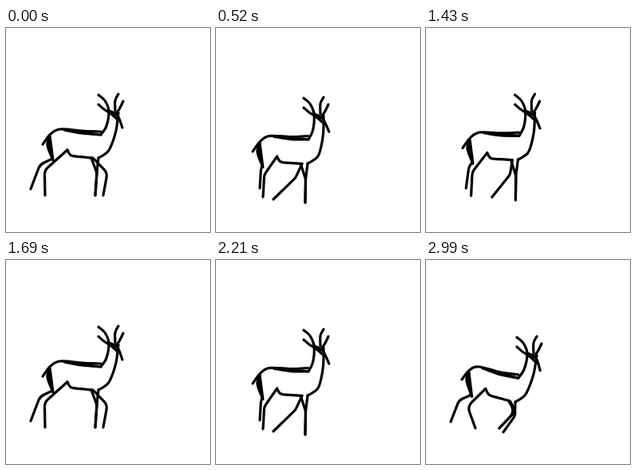
These frames come from a looping animation (256x256 px, 3120 ms). An HTML page with a canvas:

```html
<!DOCTYPE html>
<html lang="en">
<head>
<meta charset="utf-8">
<title>Walking antelope</title>
<style>
html, body { margin: 0; width: 100%; height: 100%; overflow: hidden; background: #fff; }
canvas { display: block; width: 256px; height: 256px; }
</style>
</head>
<body>
<canvas id="stage" width="256" height="256"></canvas>
<script>
const ctx = document.getElementById('stage').getContext('2d');
const STEP = 130, FRAMES = 24, STRIDE = 6.5;

const points = text => text.split(' ').map(p => p.split(',').map(Number));

// The body at rest; the gait bends these few curves.
const lines = {
  nape: '116,84 124,91 129,104 126,123 119,134',
  ear: '116,96 123,102 131,107 139,114',
  horn: '141,83 137,91 137,104',
  farEar: '147,92 142,102 136,110',
  face: '130,104 140,110 146,125',
  throat: '141,106 138,129 130,152 123,159 116,163',
  back: '119,130 95,129 68,127 56,133 46,146',
  belly: '77,153 82,160 98,162 107,163'
};
const body = Object.values(lines).map(points);
const shades = ['73,128 95,132 119,134', '55,135 52,147 59,166'].map(points);

// Each leg hangs from one or two places; knee is its height along the leg.
const legs = [
  { hips: points('58,164'), knee: .2 },
  { hips: points('77,153'), knee: .45 },
  { hips: points('107,163 116,163'), knee: .4 },
  { hips: points('109,163'), knee: .4 }
];

// Shifts of rump, chest and head, then each foot as x, y and knee bend.
const reach = {
  rump: [0, 0], chest: [0, 0], head: [0, 0],
  feet: [[31, 202, -10], [49, 210, -16], [112, 210, 5], [122, 210, 13]]
};
const stand = {
  rump: [0, 0], chest: [0, 0], head: [-.5, .5],
  feet: [[31, 204, -10], [45, 211, -16], [107, 211, 5], [127, 211, 8]]
};
const dip = {
  rump: [-1, 4], chest: [-4, 15], head: [-2, 13],
  feet: [[31, 203, -10], [62, 211, -17], [92, 211, 13], [97, 216, 12]]
};
const pass = {
  rump: [0, 9], chest: [-1, 7], head: [-6, 4],
  feet: [[55, 201, -1], [59, 212, -8], [112, 219, 4], [72, 215, 6]]
};
const rise = {
  rump: [0, -2], chest: [0, -5], head: [-2, -6],
  feet: [[43, 201, -5], [53, 208, -12], [113, 211, 4], [99, 208, 9]]
};
const gait = [[0, reach], [1.5, stand], [3.5, dip], [4, pass], [5.25, rise], [STRIDE, reach]];

const clamp = v => Math.min(1, Math.max(0, v));
const lerp = (a, b, k) => Array.isArray(a)
  ? a.map((v, i) => lerp(v, b[i], k))
  : a + (b - a) * k;

function poseAt(phase) {
  const n = gait.findIndex(([t]) => t > phase);
  const [t0, a] = gait[n - 1], [t1, b] = gait[n];
  const k = (phase - t0) / (t1 - t0);
  return Object.fromEntries(Object.keys(a).map(part => [part, lerp(a[part], b[part], k)]));
}

// Blend the shift from rump to chest, and up the neck to the head.
function bend([x, y], pose) {
  const trunk = lerp(pose.rump, pose.chest, clamp((x - 50) / 66));
  const neck = clamp((x - 100) / 12) * clamp((150 - y) / 40);
  const [dx, dy] = lerp(trunk, pose.head, neck);
  return [x + dx, y + dy];
}

// Smooth curve through every point.
function curve(pts, filled) {
  ctx.beginPath();
  ctx.moveTo(...pts[0]);
  for (let i = 0; i < pts.length - 1; i++) {
    const p = pts[i], q = pts[i + 1];
    const before = pts[i - 1] || p, after = pts[i + 2] || q;
    ctx.bezierCurveTo(
      p[0] + (q[0] - before[0]) / 6, p[1] + (q[1] - before[1]) / 6,
      q[0] - (after[0] - p[0]) / 6, q[1] - (after[1] - p[1]) / 6, ...q);
  }
  if (filled) {
    ctx.closePath();
    ctx.fill();
  }
  ctx.stroke();
}

function drawLeg({ hips, knee }, [x, y, kneeBend], pose) {
  const tops = hips.map(hip => bend(hip, pose));
  const joint = lerp(tops[0], [x, y], knee);
  joint[0] += kneeBend;
  for (const top of tops) {
    ctx.beginPath();
    ctx.moveTo(...top);
    ctx.arcTo(...joint, x, y, 12);
    ctx.lineTo(x, y);
    ctx.stroke();
  }
}

ctx.lineCap = ctx.lineJoin = 'round';
ctx.lineWidth = 3.2;
const start = performance.now();

function draw() {
  const frame = Math.floor((performance.now() - start) / STEP) % FRAMES;
  const pose = poseAt(frame % STRIDE);
  const bent = pts => pts.map(p => bend(p, pose));
  ctx.fillStyle = '#fff';
  ctx.fillRect(0, 0, 256, 256);
  ctx.fillStyle = ctx.strokeStyle = '#000';
  body.forEach(line => curve(bent(line)));
  shades.forEach(shade => curve(bent(shade), true));
  legs.forEach((leg, i) => drawLeg(leg, pose.feet[i], pose));
  requestAnimationFrame(draw);
}
draw();
</script>
</body>
</html>
```
